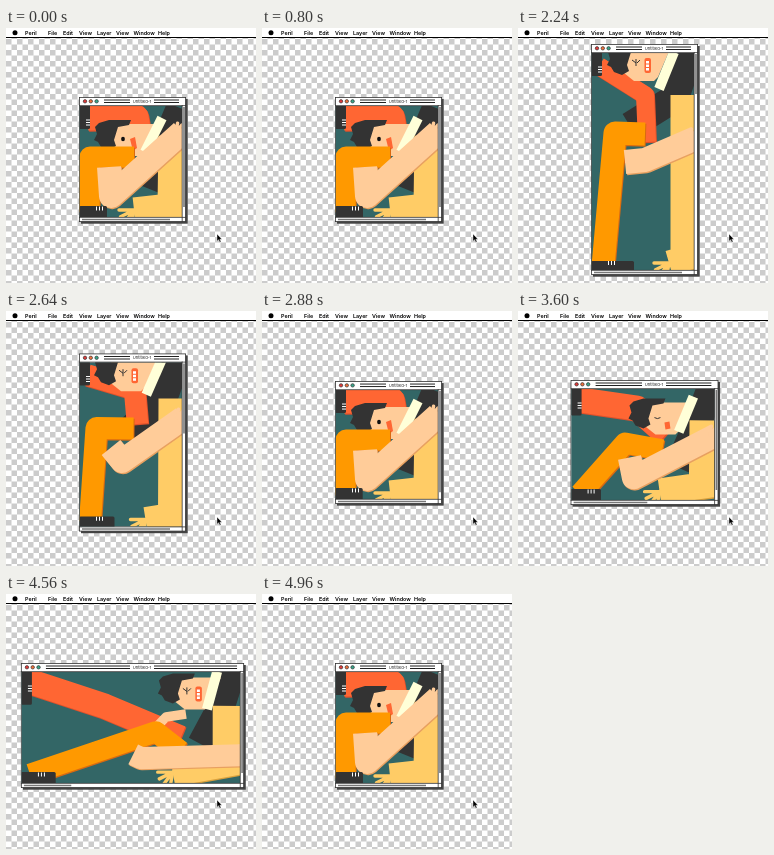
Animation of 250 by 255 pixels, one loop 5040 ms. Source, as an HTML page:

```html
<!DOCTYPE html>
<html lang="en">
<head>
<meta charset="utf-8">
<title>Window squeeze</title>
<style>
html, body { margin: 0; width: 100%; height: 100%; overflow: hidden; background: #fff; }
svg { display: block; width: 100%; height: 100%; }
text { font-family: Inter, "Liberation Sans", sans-serif; }
#menu text { font-size: 5.4px; font-weight: 600; }
</style>
</head>
<body>
<svg viewBox="0 0 250 255">
  <defs>
    <pattern id="check" width="11" height="11" patternUnits="userSpaceOnUse">
      <path fill="#fff" d="M0 0h11v11h-11z"/>
      <path fill="#ccc" d="M0 0h5.5v5.5h-5.5zM5.5 5.5h5.5v5.5h-5.5z"/>
    </pattern>
    <clipPath id="view"><rect id="viewRect"/></clipPath>
  </defs>
  <rect width="250" height="255" fill="url(#check)"/>
  <g id="menu">
    <rect width="250" height="10" fill="#fff"/>
    <rect y="9" width="250" height="1"/>
    <circle cx="9" cy="4.7" r="2.5"/>
    <text x="19" y="6.8">Peril</text><text x="42" y="6.8">File</text>
    <text x="57" y="6.8">Edit</text><text x="73" y="6.8">View</text>
    <text x="91" y="6.8">Layer</text><text x="110" y="6.8">View</text>
    <text x="127.5" y="6.8">Window</text><text x="152" y="6.8">Help</text>
  </g>
  <rect id="shadow" fill="#444"/>
  <rect id="frame" fill="#fff" stroke="#333" stroke-width=".8"/>
  <g id="buttons" stroke="#333" stroke-width=".7">
    <circle r="1.7" fill="#e23b3b"/><circle r="1.7" fill="#f0703c"/><circle r="1.7" fill="#3aa68a"/>
  </g>
  <path id="rules" stroke="#222" fill="none"/>
  <text id="title" x="136" font-size="4.1" text-anchor="middle" fill="#222">Untitled-1</text>
  <g id="art" clip-path="url(#view)"></g>
  <path id="bars" stroke="#333" stroke-width=".8" fill="none"/>
  <path id="thumbs" stroke="#777" stroke-width="1.6" fill="none"/>
  <path d="M211 206v7.2l1.6-1.5 1.2 2.6 1.2-.5-1.2-2.6h2.1z" stroke="#fff" stroke-width=".4"/>
</svg>
<script>
const LOOP = 5040, STEP = 80;
const DARK = '#333', RED = '#f63', ORANGE = '#f90', PEACH = '#fc9', YELLOW = '#fc6';
const $ = id => document.getElementById(id);
const set = (el, o) => { for (const k in o) el.setAttribute(k, o[k]); return el; };
const add = (parent, tag, o = {}) =>
  parent.appendChild(set(document.createElementNS('http://www.w3.org/2000/svg', tag), o));
const path = (parent, d, fill) => add(parent, 'path', { d, fill });
const line = (parent, d, stroke, width = 1) =>
  add(parent, 'path', { d, stroke, 'stroke-width': width, fill: 'none' });

const art = $('art');
add(art, 'rect', { width: 250, height: 255, fill: '#366' });

// A limb is a thick line through a few joints, given for the compact, tall and wide window.
const joints = s => s.split(' ').map(p => p.split(',').map(Number));
const mix = ([a, tall, wide], v, h) =>
  a.map((p, i) => p.map((n, j) => n + v * (tall[i][j] - n) + h * (wide[i][j] - n)));

function limb(color, shade, join, ...poses) {
  const g = add(art, 'g', { fill: 'none', 'stroke-linejoin': join });
  if (shade) add(g, 'path', { stroke: shade, transform: 'translate(1 1.2)' });
  add(g, 'path', { stroke: color });
  const keys = poses.map(joints);
  return (v, h, width) => {
    const pts = mix(keys, v, h);
    g.setAttribute('stroke-width', width);
    for (const p of g.children) p.setAttribute('d', 'M' + pts.join('L'));
    return pts;
  };
}

function shoe(laces) {
  const g = add(art, 'g');
  const sole = add(g, 'rect', { fill: DARK, rx: 1.5 });
  const lace = line(g, laces, '#fff');
  return (x, y, width, height, lx, ly) => {
    set(sole, { x, y, width, height });
    move(lace, lx, ly);
  };
}

function hand(color, from, to, reach) {
  let d = '';
  for (let i = 0; i < 4; i++) {
    const a = (from + (to - from) * i / 3) * Math.PI / 180;
    d += `M0 0L${reach * Math.cos(a)} ${reach * Math.sin(a)}`;
  }
  return set(line(art, d, color, 3.4), { 'stroke-linecap': 'round' });
}

const body = limb(DARK, '', 'round',
  '174,80 158,118 141,160', '174,20 157,70 112,98', '230,70 216,115 197,150');
const backLeg = limb(RED, '#e0502a', 'round',
  '82,90 130,89 134,112', '81,38 127,67 129,114', '18,86 98,113 176,145');
const backShoe = shoe('M-3 0h4M-3 2.5h4M-3 5h4');
const farArm = limb(PEACH, '', 'round', ...Array(3).fill('141,143 160,123 180,120'));

const head = add(art, 'g');
path(head, 'M-12-14H34L22 14 18 18H-2L-12 10z', PEACH);
path(head, 'M-28-11L-24-15-14-18H8L6-13-5-11-9 2-7 8-14 12-22 9-25 4-29 2-26-4z', DARK);
const calm = add(head, 'g'), shut = add(head, 'g'), strain = add(head, 'g');
const eye = add(calm, 'ellipse', { rx: 1.9, cy: 1, fill: '#111' });
path(calm, 'M7 1L12-1 14 10 10 13z', RED);
path(calm, 'M5 11h3v7h-3z', '#ffe6cc');
line(shut, 'M-3 1q3 2 6 0', DARK);
path(shut, 'M7 6L12 5 13 12 8 13z', RED);
line(strain, 'M-4-3L0 0M0-4L0 3M4-3L1 0', DARK);
add(strain, 'rect', { x: 8.5, y: -5, width: 6.5, height: 15, rx: 2, fill: RED });
path(strain, 'M10-2h3v2.5h-3zM10 1.5h3v2.5h-3zM10 5h3v2.5h-3z', '#fff');

const collar = limb('#ffffd8', '', 'round', '156,90 139,124', '156,24 141,61', '213,77 203,115');
const nearArm = limb(YELLOW, '#d9a03c', 'miter',
  '165,108 164,178 128,182', '165,67 165,231 151,235', '223,112 223,168 168,178');
const palm = hand(YELLOW, 180, 100, 15);
const frontLeg = limb(ORANGE, '#d96a10', 'round',
  '83,184 84,129 128,129', '85,238 97,105 127,106', '22,180 152,138 176,158');
const forearm = limb(PEACH, '#e8a060', 'round',
  '103,139 105,168 176,104', '107,134 127,132 178,110', '128,161 136,164 240,163');
const grip = hand(PEACH, 280, 370, 9);
const frontShoe = shoe('M0 0v4M3 0v4M6 0v4');

const clamp = x => Math.min(1, Math.max(0, x));
const easeInOut = (p, k) => p < .5 ? (2 * p) ** k / 2 : 1 - (2 - 2 * p) ** k / 2;
// 0 is the small window, 1 the fully pulled one; growing takes 7 steps, shrinking 6.
function pull(t, grow, shrink, k) {
  const done = (start, steps) => easeInOut(clamp((t - start + STEP) / STEP / steps), k);
  return done(grow, 7) - done(shrink, 6);
}
const shake = (t, start) =>
  t >= start && t < start + 6 * STEP ? Math.cos(Math.PI * (t - start) / STEP) : 0;

const move = (el, x, y) => el.setAttribute('transform', `translate(${x} ${y})`);
const show = (el, on) => el.setAttribute('visibility', on ? 'visible' : 'hidden');
const box = (el, x, y, x2, y2) => set(el, { x, y, width: x2 - x, height: y2 - y });

function drawWindow(v, h) {
  const l = 73 - 60 * h, r = 180 + 60 * h, t = 69 - 53 * v, b = 194 + 53 * v;
  box($('shadow'), l + 2, t + 2, r + 1.7, b + 1.7);
  box($('frame'), l + .4, t + .4, r - .4, b - .4);
  box($('viewRect'), l + .8, t + 9, r - 4, b - 5);
  [...$('buttons').children].forEach((c, i) => set(c, { cx: l + 6 + i * 5.8, cy: t + 4.3 }));
  const rule = y => `M${l + 25} ${t + y}H124M148 ${t + y}H${r - 7}`;
  $('rules').setAttribute('d', rule(3) + rule(5.5));
  $('title').setAttribute('y', t + 5.7);
  $('bars').setAttribute('d', `M${l} ${t + 8.6}H${r}M${r - 3.8} ${t + 8}V${b}M${l} ${b - 4.6}H${r}`);
  $('thumbs').setAttribute('d',
    `M${l + 3} ${b - 2.5}h${88 - 42 * h}M${r - 2} ${t + 10}v${100 - 60 * v}`);

  backShoe(l, t + 8, 11, 24 + 10 * h, l + 10, t + 23);
  frontShoe(l, b - 16 + 2 * v, 28 + 15 * v + 7 * h, 20, l + 17.5, b - 15.5 + 1.5 * v);
}

function drawFigure(v, h, shift) {
  // The head runs ahead of the window as it rises.
  const rise = v ** .65;
  body(rise, h, 28);
  collar(rise, h, 10);
  move(head, 117 + 66 * h + shift, 110 - 75 * rise - 13 * h);
  backLeg(v, h, 25 - 7 * v);
  farArm(v, h, 10 * clamp(2 * h - 1));
  frontLeg(v, h, 21 + 2 * v);
  move(palm, ...nearArm(v, h, 25 + 4 * h).pop());
  const [x, y] = forearm(v, h, 24 - 2 * h).pop();
  move(grip, x - 6, y);
}

function draw(time) {
  const t = Math.floor(time % LOOP / STEP) * STEP;
  const v = pull(t, 1360, 2480, 1), h = pull(t, 3440, 4560, 2.5);
  const recoil = t >= 2880 && t < 3040 ? .02 : 0;
  drawWindow(v - recoil, h);
  drawFigure(clamp(v), clamp(h), shake(t, 1920) + shake(t, 4000));

  const tight = v > .15 || h > .5, closed = !tight && h > .1;
  show(strain, tight);
  show(shut, closed);
  show(calm, !tight && !closed);
  eye.setAttribute('ry', t === 720 ? .5 : 2.3);
}

const begin = performance.now();
function tick() {
  draw(performance.now() - begin);
  requestAnimationFrame(tick);
}
tick();
</script>
</body>
</html>
```
